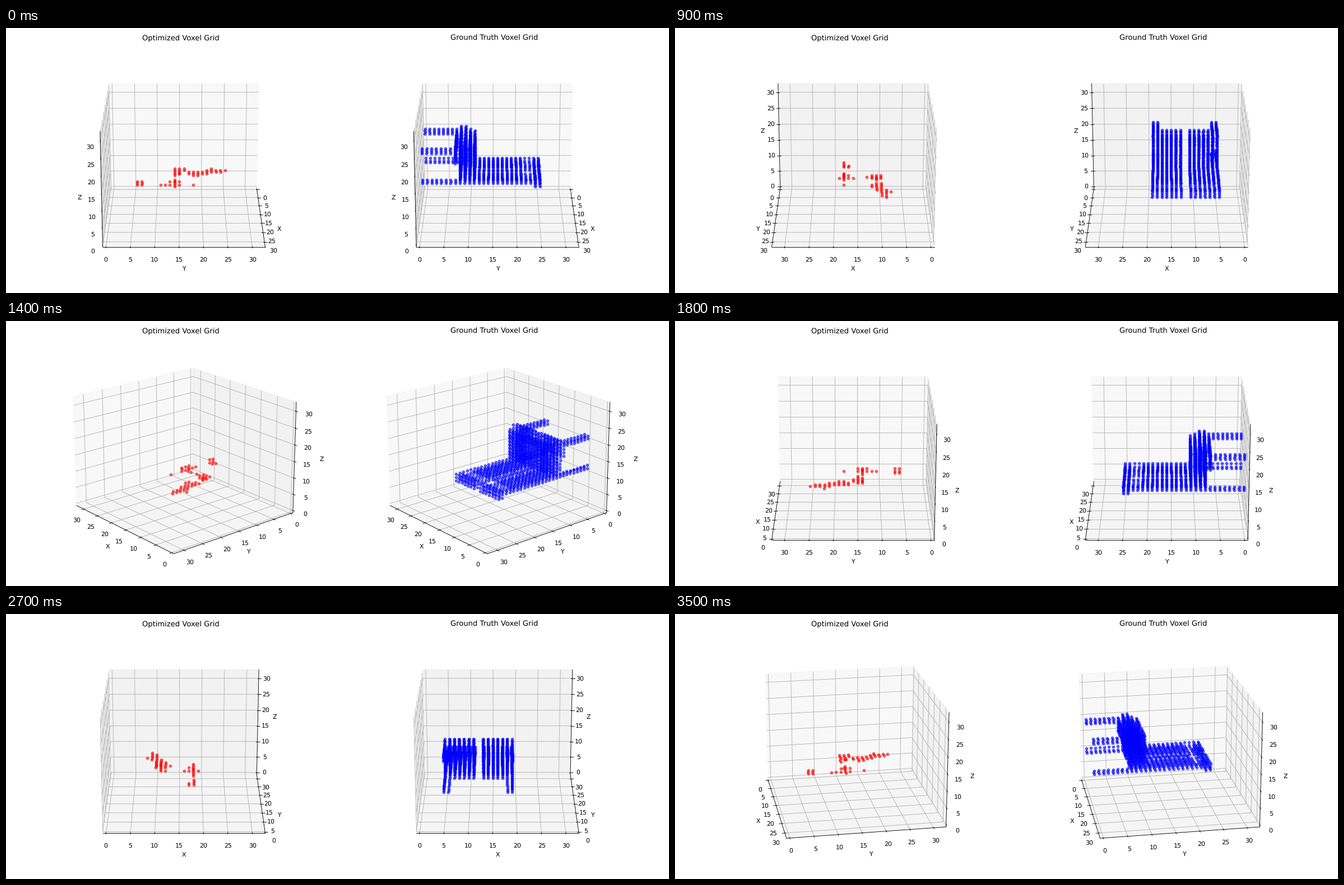
Write a matplotlib script that moves like this. It is 1183x473 px and loops after 3600 ms.

```python
import matplotlib.pyplot as plt
import numpy as np
from matplotlib.animation import FuncAnimation

W, H, DPI = 1183, 473, 78.87
FRAMES, INTERVAL = 36, 100
SIDE, BOTTOM = 432.3, 11.83       # square plot area, in pixels
CENTERS = 311.7, 871.3
GRID = 32
MARGIN = GRID / 48
LIMITS = -MARGIN, GRID + MARGIN

X, Y, Z = np.indices((GRID,) * 3)


def between(values, low, high):
    return (low <= values) & (values <= high)


def chair():
    """A chair lying on its back, mirrored about x = 12."""
    side = abs(X - 12)
    inner_corner = (Z == 12) & (side == 6)
    legs = (Y < 8) & (side > 5) & (between(Z, 11, 12) | between(Z, 20, 21))
    legs &= ~inner_corner
    apron = (Y == 7) & between(Z, 17, 21)
    seat = between(Y, 8, 11) & (side < 18 - Y) & between(Z, 11, 22 - (Y > 9))
    recess = between(Y, 22, 23) & (side < 7)
    back = between(Y, 11, 25) & between(Z, 11 - (Y > 23), 12 - recess)
    return between(side, 1, 7) & (legs | apron | seat | back)


def fragments():
    """Loose pieces: a bent strip along y, and a broken rail at x = 18."""
    low = np.interp(Y, [20, 22, 23], [10, 8, 9])
    high = np.interp(Y, [14, 15, 16, 17, 18, 19, 25],
                     [12, 13, 11, 11, 12, 12, 9.9])
    strip = between(Y, 14, 25) & between(X, low, high) & (Z == 10 + (Y < 17))
    strip |= between(Y, 14, 15) & between(X, 11, 26 - Y) & (Z == 10)

    layers = between(Z, 10, 11)
    pair = between(Y, 6, 7) & between(X, 17, 18) & layers & (X - Z >= 7)
    rail = (X == 18) & (Z == 10) & (between(Y, 11, 12) | (Y == 18))
    knot = (X == 18) & between(Y, 13, 15) & layers
    knot |= (Y == 14) & layers & (abs(X - 17.5) + Z <= 11.5)
    return strip | pair | rail | knot


def add_plot(center, title, voxels, color):
    rect = [(center - SIDE / 2) / W, BOTTOM / H, SIDE / W, SIDE / H]
    ax = fig.add_axes(rect, projection="3d")
    ax.scatter(*np.nonzero(voxels), s=16, c=color, alpha=0.6,
               depthshade=False)
    ax.set(xlim=LIMITS, ylim=LIMITS, zlim=LIMITS,
           xlabel="X", ylabel="Y", zlabel="Z", title=title)
    return ax


plt.rcParams["text.hinting"] = "no_hinting"
# The tiny excess keeps the pixel size from rounding down.
fig = plt.figure(figsize=((W + 1e-6) / DPI, (H + 1e-6) / DPI), dpi=DPI)
plots = [
    add_plot(CENTERS[0], "Optimized Voxel Grid", fragments(), "red"),
    add_plot(CENTERS[1], "Ground Truth Voxel Grid", chair(), "blue"),
]


def update(frame):
    for ax in plots:
        ax.view_init(elev=20, azim=frame * 360 / FRAMES)
    return plots


anim = FuncAnimation(fig, update, frames=FRAMES, interval=INTERVAL,
                     init_func=lambda: update(0), repeat=True, repeat_delay=0)
plt.show()
```
